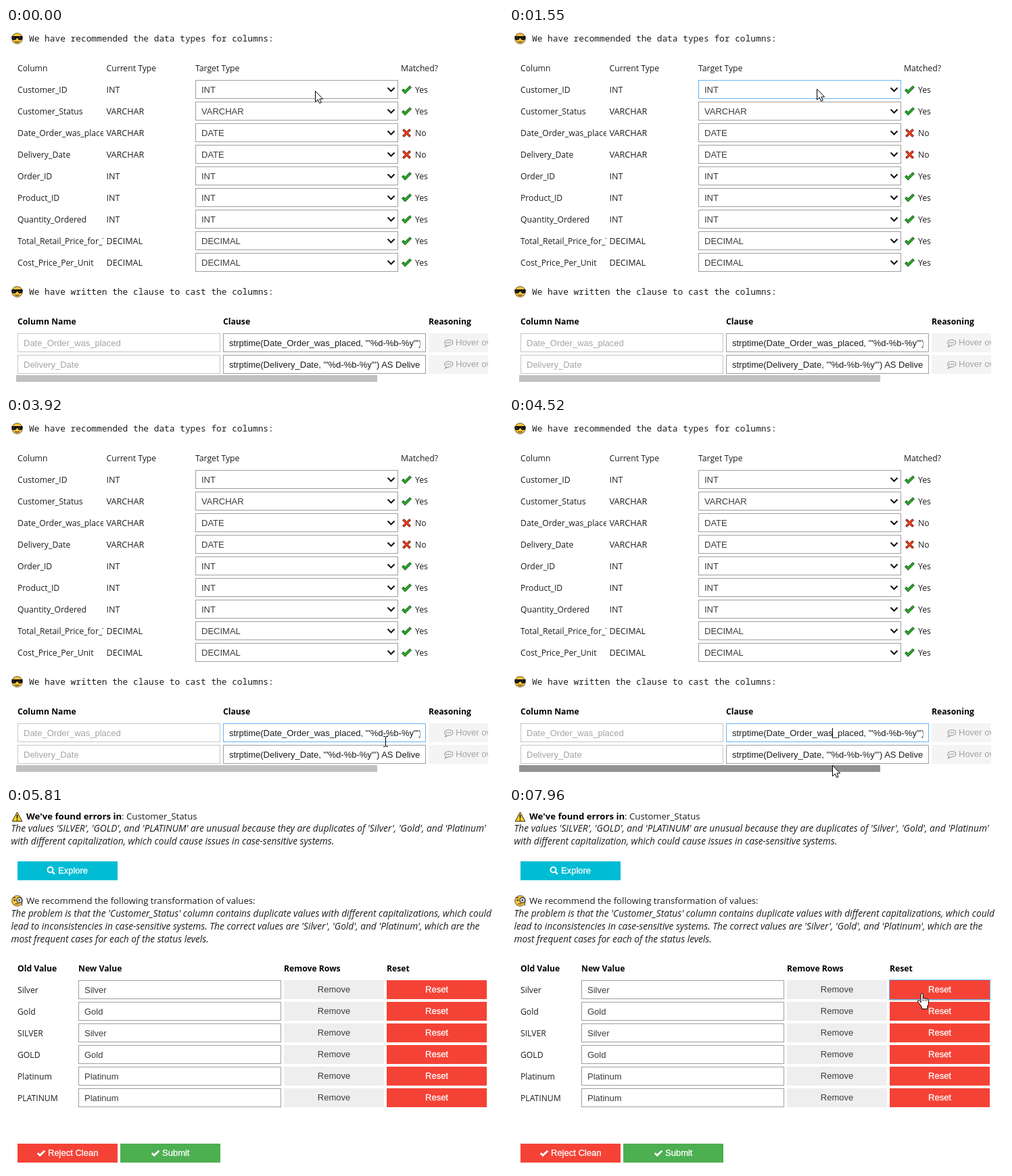
Recreate the animation shown at these times as an HTML page. Size 735x536 px, loop 8 s.

```html
<!DOCTYPE html>
<html lang="en">
<head>
<meta charset="utf-8">
<title>Column types and value cleaning</title>
<style>
html, body { margin: 0; width: 100%; height: 100%; overflow: hidden; background: #fff; }
svg { display: block; width: 735px; height: 536px; }
text { white-space: pre; }
.ui { font: 12.2px "Open Sans", "Noto Sans", sans-serif; fill: #1c1c1c; }
.caps { font-size: 12.6px; }
.big { font-size: 13.2px; }
.bold { font-weight: 700; fill: #000; }
.it { font-size: 13.75px; font-style: italic; }
.mono { font: 12.83px "Noto Sans Mono", "DejaVu Sans Mono", monospace; fill: #1c1c1c; }
.in { font: 13px "Liberation Sans", Arial, sans-serif; fill: #3c3c3c; }
.dark { fill: #1c1c1c; }
.dim { fill: #a4a4a4; }
.white { fill: #fff; stroke: #fff; stroke-width: .3; }
.box { fill: #fff; stroke: #9e9e9e; }
.off { stroke: #c6c6c6; }
</style>
</head>
<body>
<svg id="stage" viewBox="0 0 735 536" xmlns="http://www.w3.org/2000/svg"></svg>
<script>
const LOOP = 8000, FOCUS = '#64b5f6', GREY = '#9e9e9e', RED = '#f44336';
const stage = document.getElementById('stage');

const text = (x, y, s, cls = 'ui', extra = '') => `<text x="${x}" y="${y}" class="${cls}" ${extra}>${s}</text>`;
const rect = (x, y, w, h, fill, extra = '') => `<rect x="${x}" y="${y}" width="${w}" height="${h}" fill="${fill}" ${extra}/>`;
const field = (x, y, cls = 'box', id = '') =>
  `<rect x="${x + .5}" y="${y + .5}" width="299" height="27" class="${cls}" ${id && `id="${id}"`}/>`;
const group = (id, body, extra = '') => `<g id="${id}" ${extra}>${body}</g>`;
const at = (x, y, body) => `<g transform="translate(${x} ${y})">${body}</g>`;
const clip = (id, x, w) => `<clipPath id="${id}"><rect x="${x}" y="0" width="${w}" height="536"/></clipPath>`;

// Icons, each centred on its own origin
const face = '<circle r="7.8" fill="#ffc83d" stroke="#4a3a10" stroke-width=".9"/>';
const cool = face + `<path d="M-8-3.4H8V-1C7.6 1.6 6.4 2.6 4.2 2.6 2 2.6 1-.2 0-.8-1 -.2-2 2.6-4.2 2.6-6.4 2.6-7.6 1.6-8-1Z" fill="#111"/>
  <path d="M-6-2 -4 1M2.4-2 4.4 1" stroke="#666" stroke-width=".8"/>
  <path d="M-3.4 4.4Q0 6.4 3.4 4.4" fill="none" stroke="#222" stroke-width="1.1"/>`;
const monocle = face + `<circle cx="3.2" cy="-1" r="3.9" fill="#d8e4ea" stroke="#333" stroke-width="1.2"/>
  <path d="M7 0V7.5" stroke="#555"/><circle cx="3.2" cy="-1" r="1.3" fill="#222"/><circle cx="-3.8" cy="-1" r="1.3" fill="#222"/>
  <path d="M-6.2-4.2Q-4-5.6-2-4.4M-3 4.8Q-.5 3.8 2 4.8" fill="none" stroke="#222" stroke-width="1.1"/>`;
const warning = `<path d="M0-7 7.3 6.8H-7.3Z" fill="#ffd21f" stroke="#222" stroke-linejoin="round"/>
  <path d="M0-3V2.4M0 3.8V5.6" stroke="#111" stroke-width="1.7"/>`;
const yes = '<path d="M-7 .8-4.6-1.4-2.3 1 4.6-5.8 7-3.6-2.3 5.8Z" fill="#21ab21" stroke="#123f12" stroke-width=".9" stroke-linejoin="round"/>';
const no = `<path d="M-6-4-4-6 0-2 4-6 6-4 2 0 6 4 4 6 0 2-4 6-6 4-2 0Z" fill="#f03a17" stroke="#5a1a10" stroke-width=".9" stroke-linejoin="round"/>`;
const tick = '<path d="M-5.3 0-1.8 3.3 5.3-3.6" fill="none" stroke="#fff" stroke-width="2.8"/>';
const lens = '<circle cx="-1" cy="-1" r="4" fill="none" stroke="#fff" stroke-width="2"/><path d="M2 2 5.4 5.4" stroke="#fff" stroke-width="2.4"/>';
const bubble = `<path d="M-3.5 3.2C-8-.5-5-4.8 0-4.8 8.5-4.8 8.5 3.4 0 3.4L-5 5.4Z" fill="none" stroke="#999" stroke-width="1.1"/>
  <path d="M-3.2-.6h1.6M-.6-.6H1M2-.6h1.6" stroke="#999" stroke-width="1.6"/>`;

function typesPage() {
  const rows = [
    ['Customer_ID', 'INT'], ['Customer_Status', 'VARCHAR'],
    ['Date_Order_was_placed', 'VARCHAR', 'DATE'], ['Delivery_Date', 'VARCHAR', 'DATE'],
    ['Order_ID', 'INT'], ['Product_ID', 'INT'], ['Quantity_Ordered', 'INT'],
    ['Total_Retail_Price_for_This_Order', 'DECIMAL'], ['Cost_Price_Per_Unit', 'DECIMAL']];
  let out = at(16.5, 15.5, cool) + text(34, 20, 'We have recommended the data types for columns:', 'mono');
  out += text(17, 64, 'Column') + text(148.5, 64, 'Current Type') + text(280, 64, 'Target Type') + text(584, 64, 'Matched?');
  rows.forEach(([name, now, goal], i) => {
    const y = 77 + 32 * i;
    out += text(17, y + 19, name, 'ui', 'clip-path="url(#nameClip)"') + text(148.5, y + 19, now, 'ui caps');
    out += field(280, y, 'box', i ? '' : 'select') + text(289, y + 19, goal || now, 'in');
    out += `<path d="M564.5 ${y + 11.5}l5 5 5-5" fill="none" stroke="#111" stroke-width="2"/>`;
    out += at(592.5, y + 14.5, goal ? no : yes) + text(605, y + 19, goal ? 'No' : 'Yes');
  });
  out += at(16.5, 390.5, cool) + text(34, 395, 'We have written the clause to cast the columns:', 'mono');
  out += text(17, 439, 'Column Name', 'ui bold') + text(321, 439, 'Clause', 'ui bold') + text(625, 439, 'Reasoning', 'ui bold');
  ['Date_Order_was_placed', 'Delivery_Date'].forEach((name, i) => {
    const y = 452 + 32 * i;
    out += field(17, y, 'box off') + text(26, y + 19, name, 'in dim') + field(321, y, 'box', 'clause' + i);
    out += text(330, y + 19, `strptime(${name}, '"%d-%b-%y"') AS ${name}`, 'in dark', 'clip-path="url(#clauseClip)"');
    out += rect(625, y, 88, 28, '#f4f4f4') + at(654.5, y + 14.5, bubble);
    out += text(665, y + 18, 'Hover over', 'in dim', 'clip-path="url(#hoverClip)"');
  });
  return out + rect(15, 514, 534, 10, '#c1c1c1', 'id="thumb"') + rect(478, 459, 1, 15, '#000', 'id="clauseCaret"');
}

function popup() {
  const types = ['INT', 'VARCHAR', 'DATE', 'DECIMAL', 'BOOLEAN', 'DOUBLE', 'TIME', 'TIMESTAMP', 'INTERVAL', 'UUID', 'BLOB', 'BIT'];
  return rect(278, 105, 306, 208, '#000', 'opacity=".08"') + rect(280.5, 105.5, 299, 205, '#fff', 'stroke="#8a8a8a"') +
    rect(281, 106, 298, 17, '#1e74d2') +
    types.map((s, i) => text(289, 119 + 17 * i, s, i ? 'in dark' : 'in white')).join('');
}

function valuesPage() {
  const rows = [['Silver', 'Silver'], ['Gold', 'Gold'], ['SILVER', 'Silver'], ['GOLD', 'Gold'], ['Platinum', 'Platinum'], ['PLATINUM', 'Platinum']];
  const para = (y, lines) => lines.map((s, i) => text(7.5, y + 19 * i, s, 'ui it')).join('');
  let out = at(16.5, 13, warning) +
    text(30, 17, '<tspan class="bold">We\'ve found errors in</tspan>: Customer_Status', 'ui big');
  out += para(35, [
    "The values 'SILVER', 'GOLD', and 'PLATINUM' are unusual because they are duplicates of 'Silver', 'Gold', and 'Platinum'",
    'with different capitalization, which could cause issues in case-sensitive systems.']);
  out += rect(17, 79, 148, 28, '#00bcd4') + at(66.5, 92.5, lens) + text(77, 97, 'Explore', 'in white');
  out += at(16.5, 137.5, monocle) + text(30, 142, 'We recommend the following transformation of values:', 'ui big');
  out += para(161, [
    "The problem is that the 'Customer_Status' column contains duplicate values with different capitalizations, which could",
    "lead to inconsistencies in case-sensitive systems. The correct values are 'Silver', 'Gold', and 'Platinum', which are the",
    'most frequent cases for each of the status levels.']);
  [[17, 'Old Value'], [107, 'New Value'], [411, 'Remove Rows'], [563, 'Reset']].forEach(([x, s]) => out += text(x, 242, s, 'ui bold'));
  out += rect(562, 256, 150, 29, '#000', 'id="shadow" opacity=".25"');
  rows.forEach(([old, now], i) => {
    const y = 255 + 32 * i;
    out += text(17, y + 19, old) + field(107, y, 'box', i ? '' : 'value') + text(116, y + 19, now, 'in', i ? '' : 'id="valueText"');
    out += rect(411, y, 148, 28, '#eee') + text(485, y + 18, 'Remove', 'in', 'text-anchor="middle"');
    out += rect(563, y, 148, 28, RED, i ? '' : 'id="reset"') + text(637, y + 18, 'Reset', 'in white', 'text-anchor="middle"');
  });
  out += rect(562.5, 254.5, 149, 29, 'none', `id="resetRing" stroke="${FOCUS}"`) + rect(0, 262, 1, 15, '#000', 'id="valueCaret"');
  out += rect(17, 497, 148, 28, RED) + at(52, 511, tick) + text(62, 515, 'Reject Clean', 'in white');
  return out + rect(169, 497, 148, 28, '#4caf50') + at(221, 511, tick) + text(231, 515, 'Submit', 'in white');
}

const pointers = group('arrow', '<path d="M.5.5V16.4L4.2 12.9 6.7 18.4 9.2 17.3 6.8 12H11.6Z" fill="#fff" stroke="#000"/>') +
  group('beam', '<path d="M0 .5H3M4 .5H7M3.5 1V15M0 15.5H3M4 15.5H7" fill="none" stroke="#000"/>') +
  group('hand', `<path d="M5.5 14V2.2a1.6 1.6 0 0 1 3.2 0V8a1.6 1.6 0 0 1 3 .5 1.6 1.6 0 0 1 2.8.6 1.5 1.5 0 0 1 2.5 1.2V15
    c0 2-1.5 3.5-1.7 5v3.5H6.8V20.5C6 18.5 3.5 16 1.2 13c-1.2-1.8.8-3 2.2-1.8z" fill="#fff" stroke="#000" stroke-linejoin="round"/>
    <path d="M8.7 8v4M11.7 8.5V12M14.5 9.5V12" stroke="#000" stroke-width=".8"/>`);

stage.innerHTML = `<defs>${clip('nameClip', 17, 127)}${clip('clauseClip', 330, 282.5)}${clip('hoverClip', 625, 88)}</defs>` +
  group('types', typesPage() + group('popup', popup())) + group('values', valuesPage()) + pointers;

const el = {};
stage.querySelectorAll('[id]').forEach(node => el[node.id] = node);

// Pointer stops: start time, shape, x, y
const stops = [
  [0, 'arrow', 457, 93], [460, 'arrow', 455, 90], [1850, 'arrow', 462, 190], [1970, 'arrow', 471, 292],
  [2120, 'arrow', 482, 360], [2240, 'arrow', 493, 415], [2360, 'arrow', 496, 440], [2480, 'beam', 490, 472],
  [2600, 'beam', 482, 494], [2750, 'beam', 482, 502], [2870, 'beam', 482, 492], [2990, 'beam', 481, 484],
  [3110, 'beam', 481, 478], [3260, 'beam', 480, 469], [3380, 'beam', 479, 463], [3680, 'beam', 505, 467],
  [3800, 'beam', 542, 470], [3920, 'beam', 558, 471], [4070, 'beam', 549, 471], [4220, 'beam', 475, 470],
  [4370, 'arrow', 476, 489], [4520, 'arrow', 478, 514], [4800, 'arrow', 476, 527], [4920, ''],
  [5930, 'arrow', 225, 465], [6050, 'beam', 207, 330], [6170, 'beam', 202, 261], [6440, 'beam', 269, 265],
  [6590, 'beam', 390, 268], [6710, 'hand', 568, 271], [6830, 'hand', 604.5, 273], [7260, 'hand', 598, 274],
  [7380, 'hand', 593, 275], [7530, 'hand', 603.5, 274]];

const show = (node, on) => node.setAttribute('visibility', on ? 'inherit' : 'hidden');
const ring = (node, on) => node.style.stroke = on ? FOCUS : GREY;

function draw(t) {
  const within = (a, b) => t >= a && t < b;
  const second = t >= 5810;
  show(el.types, !second);
  show(el.values, second);

  ring(el.select, within(610, 3530));
  show(el.popup, within(610, 1550));
  el.popup.setAttribute('opacity', t < 730 ? .6 : 1);
  ring(el.clause0, within(3530, 5790));
  show(el.clauseCaret, within(3530, 3920) || within(4220, 4800) || within(5340, 5790));
  el.thumb.setAttribute('fill', within(4520, 4800) ? '#929292' : '#c1c1c1');

  const typed = within(6590, 7960);
  el.valueText.textContent = typed ? 'Silvers' : 'Silver';
  ring(el.value, within(6170, 7810));
  show(el.valueCaret, within(6170, 7260));
  el.valueCaret.setAttribute('x', typed ? 155 : 149);
  show(el.shadow, t >= 6710);
  show(el.resetRing, t >= 7810);
  el.reset.setAttribute('fill', within(7810, 7960) ? '#d32f2f' : RED);

  const [, shape, x, y] = stops.filter(s => s[0] <= t).pop();
  for (const name of ['arrow', 'beam', 'hand']) show(el[name], name === shape);
  if (shape) el[shape].setAttribute('transform', `translate(${x} ${y})`);
}

const start = performance.now();
function tickFrame(now) {
  draw(Math.max(0, now - start) % LOOP);
  requestAnimationFrame(tickFrame);
}
draw(0);
requestAnimationFrame(tickFrame);
</script>
</body>
</html>
```
